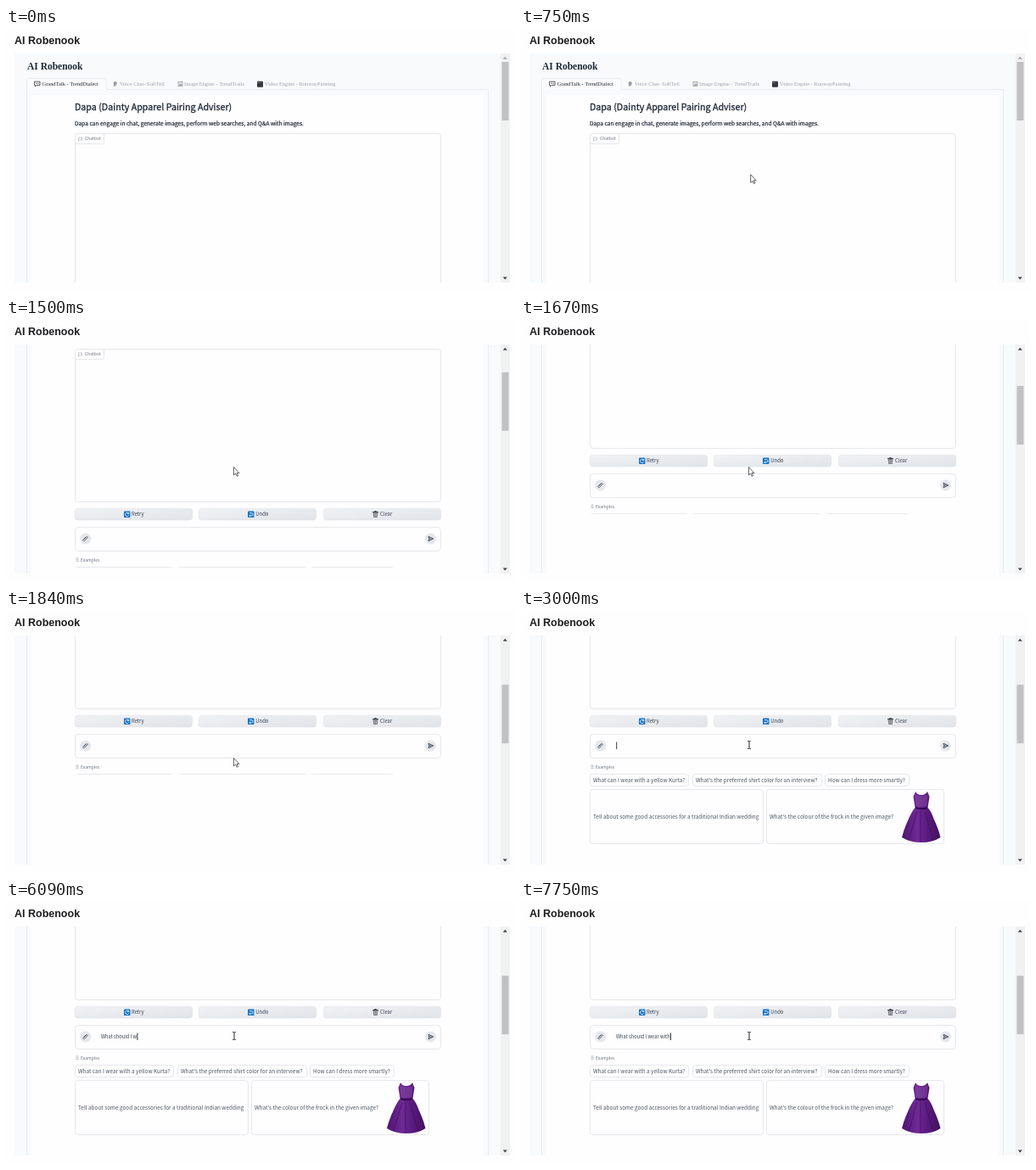
Animation of 600x310 px, one loop 8000 ms. Source, as an HTML page:

```html
<!DOCTYPE html>
<html lang="en">
<head>
<meta charset="utf-8">
<title>AI Robenook</title>
<style>
html, body { margin: 0; width: 100%; height: 100%; overflow: hidden; background: #fefefe; }
svg { display: block; width: 600px; height: 310px; }
text { font-family: "Noto Sans CJK JP", "Noto Sans CJK SC", "Noto Sans CJK", "Noto Sans", sans-serif; fill: #4b5563; white-space: pre; }
.brand { font: bold 12.5px "Liberation Sans", Arial, sans-serif; fill: #1c1c1f; }
.title { font: bold 11.5px "Liberation Serif", Times, serif; fill: #1f2937; }
.tab { font: 6.45px "Liberation Serif", Times, serif; fill: #9ca3af; }
.on { fill: #1f2937; }
.head { font-size: 10.7px; font-weight: 500; fill: #1f2937; stroke: #1f2937; stroke-width: .3; }
.desc { font-size: 6.6px; font-weight: 500; fill: #1f2937; stroke: #1f2937; stroke-width: .22; }
.chip { font-size: 6.41px; }
.btn { font-size: 5.9px; fill: #374151; }
.label { font-size: 5px; fill: #6b7280; }
.typed { font-size: 5.73px; fill: #374151; }
.box { fill: #fefdff; stroke: #e7e8ed; }
</style>
</head>
<body>
<svg viewBox="0 0 600 310" xmlns="http://www.w3.org/2000/svg">
  <defs>
    <clipPath id="view"><rect x="10" y="30" width="573" height="270"/></clipPath>
    <clipPath id="painted"><rect width="600" height="382" id="limit"/></clipPath>
    <linearGradient id="face" x1="0" y1="0" x2="1" y2="1">
      <stop offset="0" stop-color="#f1f2f5"/><stop offset="1" stop-color="#e0e3e8"/>
    </linearGradient>
    <linearGradient id="silk" x1="0" x2="1">
      <stop offset="0" stop-color="#4c1470"/><stop offset=".4" stop-color="#702a96"/>
      <stop offset=".65" stop-color="#5a1b80"/><stop offset="1" stop-color="#42105f"/>
    </linearGradient>
  </defs>
  <rect width="600" height="310" fill="#fefefe"/>
  <text class="brand" x="10" y="19">AI Robenook</text>
  <rect x="10" y="30" width="573" height="270" fill="#f8fafc"/>

  <g clip-path="url(#view)">
    <g id="page">
      <text class="title" x="25" y="49">AI Robenook</text>
      <rect x="25" y="73" width="544" height="500" fill="#f9fafd"/>
      <rect x="30" y="79" width="533" height="500" fill="#fefdff"/>
      <path d="M24.500 600V62.500a3 3 0 0 1 3-3H115a3 3 0 0 1 3 3V72.500H568.500V600" fill="none" stroke="#e8eaee"/>
      <path d="M25 73V62.500a2.500 2.500 0 0 1 2.500-2.500H115a2.500 2.500 0 0 1 2.500 2.500V73Z" fill="#fcfcfe"/>

      <path d="M33.500 63.200h6.500v4.200h-4l-1.500 1.700v-1.700h-1z" fill="#fff" stroke="#333" stroke-width=".8"/>
      <path d="M35 65.300h3.700" stroke="#333" stroke-width=".9" stroke-dasharray=".9 .5"/>
      <path d="M127 63.700q2-1.500 3.300 0l.8 2.200-.9.300v1.600h-1.500v1h-1.700v-2.200q-1-1.500 0-2.900z" fill="#9a9da5"/>
      <rect x="203" y="63.400" width="5" height="5" fill="#e8e9ed" stroke="#9a9da5" stroke-width=".8"/>
      <path d="M203.500 67.800l1.600-2.200 1 1 .8-1 1 2.200z" fill="#9a9da5"/>
      <rect x="296" y="62.700" width="7" height="7" rx="1" fill="#33363c"/>
      <path d="M296.500 64.500h4" stroke="#b7bac0" stroke-width=".7" stroke-dasharray="1 .8"/>
      <text class="tab on" x="42.500" y="68.200">GrandTalk - TrendDialect</text>
      <text class="tab" x="134" y="68.200">Voice Chat- SoftTell</text>
      <text class="tab" x="210" y="68.200">Image Engine - TrendTrails</text>
      <text class="tab" x="305" y="68.200">Video Engine - RunwayPainting</text>

      <text class="head" x="81" y="96.700">Dapa (Dainty Apparel Pairing Adviser)</text>
      <text class="desc" x="81" y="114.700">Dapa can engage in chat, generate images, perform web searches, and Q&amp;A with images.</text>
      <rect class="box" x="81.500" y="124.500" width="431" height="180" rx="3.500"/>
      <path d="M81.500 136.500h32a2 2 0 0 0 2-2v-10" fill="none" stroke="#e7e8ed"/>
      <path d="M85.500 129h4v3h-2.500l-1.500 1z" fill="none" stroke="#a5aab4" stroke-width=".6"/>
      <text class="label" x="93" y="132.300">Chatbot</text>

      <g id="buttons"></g>
      <rect class="box" x="81.500" y="334.500" width="431" height="28" rx="4"/>
      <circle cx="93.700" cy="348" r="6.500" fill="#e5e7eb"/>
      <path d="M91.500 349.300l3.300-3.300q1.200-.8 1.700.3l-3.800 4q-1.600 1-2-.8l3.700-4" fill="none" stroke="#4b5563" stroke-width=".8"/>
      <circle cx="500.500" cy="348" r="6.500" fill="#e5e7eb"/>
      <path d="M498 345.300l5.800 2.700-5.800 2.700.8-2.700zM498.800 348h3" fill="none" stroke="#374151" stroke-width=".9"/>
      <text class="typed" id="typed" x="112" y="349.700"></text>
      <rect id="caret" y="343.500" width=".9" height="8.500" fill="#222"/>

      <path d="M82.500 371h3M82.500 372.700h3M82.500 374.400h3" stroke="#8b919c" stroke-width=".6"/>
      <text class="label" x="88" y="374.800">Examples</text>
      <g clip-path="url(#painted)">
        <g id="chips"></g>
        <g transform="translate(0 188)">
          <path d="M465 214q2 4 7 4t7-4l2.500 6-2 13q4 4 7 13 6 13 8 22-9 6-22.500 6t-23-6q2-9 8-22 4-9 7.500-13l-2-13z" fill="url(#silk)"/>
          <path d="M464.500 217q7.500 5 15 0l-1 14q-6 2-13 0z" fill="#8a55a3" opacity=".4"/>
          <path d="M465 232q7 2.500 14 0v2q-7 2.500-14 0z" fill="#35094f"/>
          <path d="M467 237q-5 18-10 34M471 237v36M476 237q5 18 10 34" fill="none" stroke="#3b0c58" stroke-width="1" opacity=".6"/>
        </g>
      </g>
    </g>
  </g>

  <rect x="583" y="30" width="11" height="270" fill="#f1f1f2"/>
  <rect id="thumb" x="584.500" y="40" width="8" height="69" fill="#c1c1c3"/>
  <path id="up" d="M585.800 36.700h5l-2.500-3z"/>
  <path d="M585.800 293.500h5l-2.500 3z" fill="#404044"/>
  <path id="arrow" d="M.4.500v9.500l2.200-2 1.600 3.300 1.400-.7-1.500-3.100h2.800z" fill="#fff" stroke="#3a3a3d" stroke-width=".8"/>
  <path id="beam" d="M-1.800-4.500q1.800 0 1.800.8v7.400q0 .8-1.800.8M1.800-4.500q-1.800 0-1.800.8M0 3.700q0 .8 1.800.8" fill="none" stroke="#222" stroke-width="1"/>
</svg>
<script>
const $ = id => document.getElementById(id);
const LOOP = 8000;
const MESSAGE = "What should I wear with";

const tile = x => `<rect x="${x}" y="315.500" width="7.500" height="7.500" rx="1" fill="#1672c4"/>`;
const icons = [
  x => tile(x) + `<path d="M${x + 5.5} 318a2.200 2.200 0 1 0 .2 2.500M${x + 5.8} 316.800v1.800h-1.800" fill="none" stroke="#e6f2fd" stroke-width=".9"/>`,
  x => tile(x) + `<path d="M${x + 2} 317.700h2.500a1.600 1.600 0 0 1 0 3.200h-2.700m1.300-1.300-1.300 1.300 1.300 1.300" fill="none" stroke="#e6f2fd" stroke-width=".9"/>`,
  x => `<path d="M${x + .5} 317h6l-.8 6h-4.400z" fill="#7b7f86"/>
    <path d="M${x} 316.500h7M${x + 2.3} 315.500h2.400" stroke="#44474d"/>
    <path d="M${x + 2.6} 318v4M${x + 4.4} 318v4" stroke="#d0d3d8" stroke-width=".6"/>`
];
const buttons = [["Retry", 81, 139, 148], ["Undo", 227, 285, 294.3], ["Clear", 374, 432, 441]];
$("buttons").innerHTML = buttons.map(([name, x, ix, tx], i) =>
  `<rect x="${x + .3}" y="312.300" width="138.400" height="13.700" rx="3.500" fill="url(#face)" stroke="#dfe2e7" stroke-width=".6"/>
  ${icons[i](ix)}<text class="btn" x="${tx}" y="321.300">${name}</text>`).join("");

const chips = [
  ["What can I wear with a yellow Kurta?", 81, 381, 116, 14],
  ["What's the preferred shirt color for an interview?", 202, 381, 152, 14],
  ["How can I dress more smartly?", 358, 381, 99, 14],
  ["Tell about some good accessories for a traditional Indian wedding", 81, 399, 204, 64],
  ["What's the colour of the frock in the given image?", 289, 399, 209, 64]
];
$("chips").innerHTML = chips.map(([words, x, y, w, h]) =>
  `<rect class="box" x="${x + .5}" y="${y + .5}" width="${w}" height="${h}" rx="3"/>
  <text class="chip" x="${x + 4}" y="${y + h / 2 + 2.7}">${words}</text>`).join("");

const ticks = [0, 90, 170, 250, 340];
const snap = t => {
  const part = t % 500;
  return t - part + ticks.filter(k => k <= part).pop();
};

const keyTimes = [
  3500, 3670, 3840, 4000, 4090, 4250, 4340, 4500, 4590, 4750, 5000, 5170,
  5500, 5750, 6090, 6340, 6590, 6750, 7170, 7250, 7500, 7590, 7750
];
const scrollKeys = [[1090, 0], [1170, 4], [1250, 15], [1340, 42], [1500, 89], [1590, 124], [1670, 152], [1750, 174], [1840, 188]];

function track(keys, t) {
  if (t <= keys[0][0]) return keys[0][1];
  for (let i = 1; i < keys.length; i++) {
    const [t0, a] = keys[i - 1], [t1, b] = keys[i];
    if (t <= t1) return a + (b - a) * (t - t0) / (t1 - t0);
  }
  return keys[keys.length - 1][1];
}

const show = (id, on) => $(id).setAttribute("visibility", on ? "visible" : "hidden");
const move = (id, x, y) => $(id).setAttribute("transform", `translate(${x} ${y})`);

function draw(time) {
  const t = snap(time);
  const scroll = Math.round(track(scrollKeys, t));
  move("page", 0, -scroll);
  move("thumb", 0, scroll * .256);
  $("up").setAttribute("fill", scroll ? "#404044" : "#a3a3a6");
  $("limit").setAttribute("height", t < 2000 ? 382 : 600);

  const k = Math.min(1, Math.max(0, (t - 340) / 500));
  const ease = k * (2 - k);
  const y = track([[2000, 174], [2170, 159]], t);
  const beam = t >= 2090;
  move("arrow", 339 - 71 * ease, t < 2000 ? 120 + 54 * ease : y);
  move("beam", 269, y);
  show("arrow", t >= 340 && !beam);
  show("beam", beam);

  const typed = $("typed");
  const count = keyTimes.filter(at => at <= t).length;
  const words = MESSAGE.slice(0, count);
  if (typed.textContent !== words) typed.textContent = words;
  $("caret").setAttribute("x", 112.3 + (count ? typed.getComputedTextLength() : 0));
  show("caret", t >= 2590);
}

function frame() {
  draw(performance.now() % LOOP);
  requestAnimationFrame(frame);
}
frame();
</script>
</body>
</html>
```
